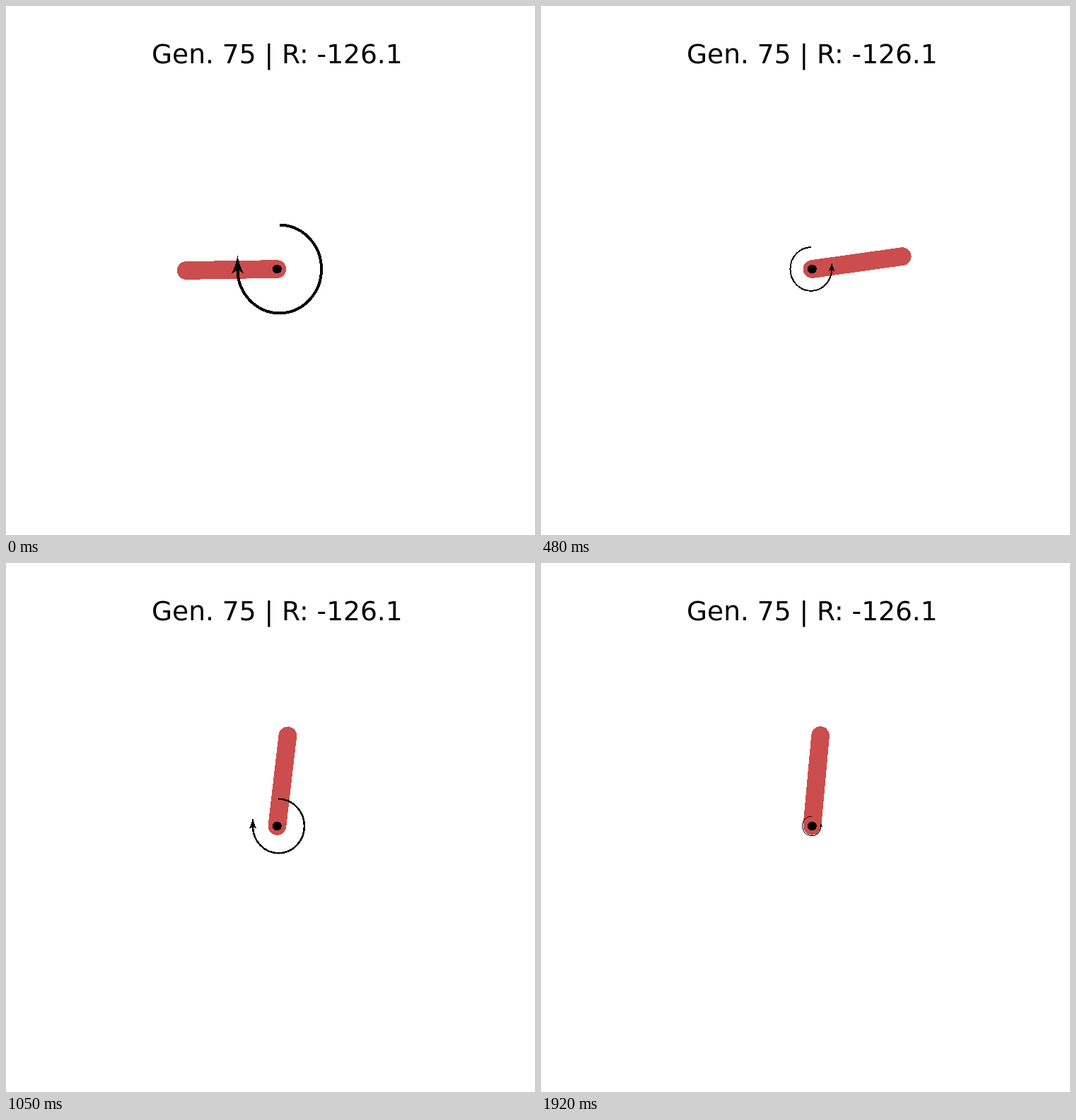
Animation of 748x748 px, one loop 6000 ms. Source, as an HTML page:

```html
<!DOCTYPE html>
<html lang="en">
<head>
<meta charset="utf-8">
<title>Pendulum</title>
<style>
  html, body { margin: 0; width: 100%; height: 100%; overflow: hidden; background: #fff; }
  svg { display: block; width: 100%; height: 100%; }
  text { font: 37.55px "DejaVu Sans", sans-serif; text-anchor: middle; }
</style>
</head>
<body>
<svg viewBox="0 0 748 748">
  <text x="383.3" y="81">Gen. 75 | R: -126.1</text>
  <g transform="translate(383.4 372)" shape-rendering="crispEdges">
    <line id="rod" y2="-128.6" stroke="#cc4d4d" stroke-width="25.7" stroke-linecap="round"/>
    <circle r="6.4"/>
    <g id="torque">
      <path d="M-3.3-62.3A59.3 62.3 0 1 0 56 .2V-4" fill="none" stroke="#000" stroke-width="4"/>
      <path d="M55.9-19Q58.5-5 64.6 6.5L55.9 1 47 6.5Q53.3-5 55.9-19Z"/>
    </g>
  </g>
</svg>
<script>
const LOOP = 6000, STEP = 30, LAST = 64;
const REST_ANGLE = 6.192, REST_TORQUE = 0.45;
const MAX_TORQUE = 2;

// Angles in radians counterclockwise from upright, four steps apart;
// the first and last only guide the curve.
const swing = [1.76, 1.586, 1.762, 2.583, 3.81, 4.852, 5.46];
const SPACING = 4, SWING_END = 16, CHATTER_START = 28;

function catmullRom([a, b, c, d], t) {
  return b + t / 2 * (c - a + t * (2 * a - 5 * b + 4 * c - d + t * (3 * (b - c) + d - a)));
}

// The arm falls through the bottom, then closes in on its rest angle.
function angleAt(k) {
  if (k < SWING_END) {
    const i = Math.floor(k / SPACING);
    return catmullRom(swing.slice(i, i + 4), k / SPACING - i);
  }
  const x = k - SWING_END;
  return REST_ANGLE - 1.34 * Math.exp(-0.151 * x - 8.5e-6 * x ** 4);
}

// Torque grows during the swing; near balance it chatters in both directions and settles.
function torqueAt(k) {
  const growing = 0.697 - 0.0326 * k + 0.00318 * k * k - 2.697 * Math.exp(-k);
  const chatter = REST_TORQUE + 1.68 * 0.6 ** (k - 35) * (-1) ** k;
  const torque = k <= CHATTER_START ? growing : chatter;
  return Math.max(-MAX_TORQUE, Math.min(MAX_TORQUE, torque));
}

const rod = document.getElementById("rod");
const arrow = document.getElementById("torque");

function draw(time) {
  const k = Math.min(LAST, Math.floor(time % LOOP / STEP));
  const size = torqueAt(k) / MAX_TORQUE;
  rod.setAttribute("transform", `rotate(${-angleAt(k) * 180 / Math.PI})`);
  arrow.setAttribute("transform", `scale(${size} ${Math.abs(size)})`);
}

const start = performance.now();
function tick() {
  draw(performance.now() - start);
  requestAnimationFrame(tick);
}
tick();
</script>
</body>
</html>
```
